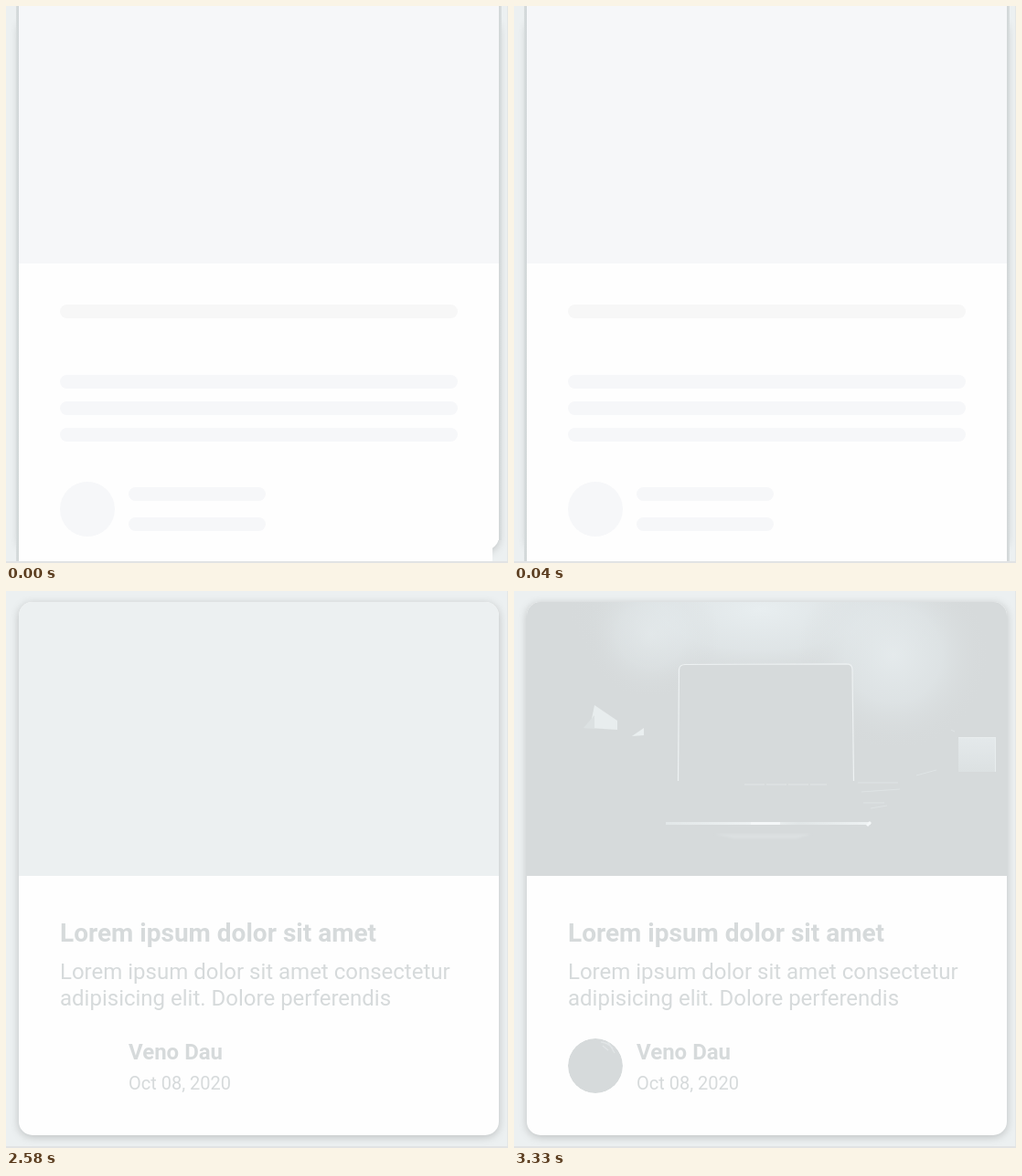
Recreate the animation shown at these times as an HTML page. Size 549 by 610 pixels, loop 3.81 s.

```html
<!DOCTYPE html>
<html lang="en">
<head>
<meta charset="utf-8">
<title>Card skeleton loading</title>
<style>
  html, body { margin: 0; width: 100%; height: 100%; overflow: hidden; background: #ecf0f1; }
  svg { display: block; width: 549px; height: 610px; }
  text { font-family: Roboto, sans-serif; fill: #d6dadb; }
  .bold { font-weight: 700; }
  .bar { fill: #f6f7f9; }
</style>
</head>
<body>
<svg viewBox="0 0 549 610">
  <defs>
    <filter id="shadow" filterUnits="userSpaceOnUse" x="-20" y="-20" width="600" height="660" color-interpolation-filters="sRGB">
      <feDropShadow dx="0" dy="2" stdDeviation="5" flood-color="#000" flood-opacity=".2"/>
    </filter>
    <filter id="soft"><feGaussianBlur stdDeviation="1.2"/></filter>
    <clipPath id="cardClip"><rect x="14" y="12" width="525" height="584" rx="15"/></clipPath>
    <clipPath id="avatarClip"><circle cx="89" cy="520" r="30"/></clipPath>
    <linearGradient id="edgeLeft">
      <stop stop-color="#d9dedf"/><stop offset="1" stop-color="#cfd5d6"/>
    </linearGradient>
    <linearGradient id="edgeRight">
      <stop stop-color="#d0d5d6"/><stop offset="1" stop-color="#dadfe0"/>
    </linearGradient>
    <radialGradient id="glow">
      <stop stop-color="#e8eef0"/>
      <stop offset=".5" stop-color="#e2e8ea" stop-opacity=".75"/>
      <stop offset="1" stop-color="#d6dadb" stop-opacity="0"/>
    </radialGradient>
    <linearGradient id="base">
      <stop stop-color="#e2e7e8"/><stop offset=".45" stop-color="#eef2f3"/>
      <stop offset=".65" stop-color="#e0e5e6"/><stop offset="1" stop-color="#eef2f3"/>
    </linearGradient>
    <linearGradient id="paper" x2="0" y2="1">
      <stop stop-color="#e4e9eb"/><stop offset="1" stop-color="#dce1e2"/>
    </linearGradient>
  </defs>

  <rect width="549" height="610" fill="#ecf0f1"/>
  <rect x="14" y="12" width="525" height="584" rx="15" fill="#fefefe" filter="url(#shadow)"/>

  <g id="skeleton">
    <rect x="11" width="3" height="608" fill="url(#edgeLeft)"/>
    <rect x="539" width="3" height="585" fill="url(#edgeRight)"/>
    <path d="M14 0H539V585H532V608H14Z" fill="#fefefe"/>
    <g id="corner">
      <rect x="532" y="585" width="7" height="23" fill="#fefefe"/>
      <rect x="539" y="585" width="3" height="23" fill="url(#edgeRight)"/>
    </g>
    <rect class="bar" x="14" width="525" height="282"/>
    <rect x="59" y="327" width="435" height="15" rx="7.5" fill="#f7f7f7"/>
    <g id="bars"></g>
    <circle class="bar" cx="89" cy="551" r="30"/>
  </g>

  <g id="content">
    <g clip-path="url(#cardClip)">
      <rect x="14" y="12" width="525" height="300" fill="#ecf0f1"/>
      <g id="photo">
        <rect x="14" y="12" width="525" height="300" fill="#d6dadb"/>
        <svg x="14" y="12" width="525" height="300" viewBox="14 12 525 300">
          <ellipse cx="270" cy="20" rx="215" ry="90" fill="url(#glow)"/>
          <ellipse cx="150" cy="48" rx="75" ry="70" fill="url(#glow)" opacity=".55"/>
          <ellipse cx="415" cy="70" rx="105" ry="105" fill="url(#glow)" opacity=".8"/>
          <path d="M180 208V86Q180 80 186 80L365 79.500Q370 80 370 86L371.500 208Z" fill="#d6dadb"/>
          <path d="M179.500 208L180.500 86Q181 80.500 187 80.500L364 79.800Q370 80 370 86L371.500 208" fill="none" stroke="#eef2f3" stroke-width="1.200"/>
          <path d="M88 125L113 142V152L83 150Z" fill="#e8edee"/>
          <path d="M76 150L88 136V151Z" fill="#dce1e2"/>
          <path d="M129 159L142 150V158Z" fill="#eaeff0"/>
          <rect x="486" y="160" width="41" height="38" fill="url(#paper)"/>
          <path d="M486 160.500H526.500V198" fill="none" stroke="#e8edee"/>
          <path d="M252 212H342" stroke="#e2e6e7" stroke-dasharray="22 2"/>
          <path d="M376 210H420M380 220L422 217M382 232H405M390 238L408 235M440 202L462 196M478 152L482 154" stroke="#dfe4e5"/>
          <rect x="166" y="253" width="224" height="3" fill="url(#base)"/>
          <path d="M259 254.500H291M386 257L390 253" stroke="#f4f7f8" stroke-width="3"/>
          <path d="M220 266H325L310 271H240Z" fill="#dce0e1" filter="url(#soft)"/>
        </svg>
      </g>
    </g>
    <g id="avatar" clip-path="url(#avatarClip)">
      <circle cx="89" cy="520" r="30" fill="#d6dadb"/>
      <path d="M95 494Q102 494 108 501M97 498L103 503M103 494L110 506" fill="none" stroke="#e1e5e6" stroke-width="1.300"/>
    </g>
    <text class="bold" x="59" y="384" font-size="28">Lorem ipsum dolor sit amet</text>
    <text x="59" y="425" font-size="24">Lorem ipsum dolor sit amet consectetur</text>
    <text x="59" y="454" font-size="24">adipisicing elit. Dolore perferendis</text>
    <text class="bold" x="134" y="513" font-size="24">Veno Dau</text>
    <text x="134" y="546" font-size="20">Oct 08, 2020</text>
  </g>

  <rect x="548" width="1" height="610" fill="#e3e6e6"/>
  <rect y="608" width="549" height="2" fill="#e1e3e4"/>
</svg>
<script>
  const LOOP = 3810, FILL_CORNER = 40, LOADED = 2580, IMAGES = 2610;
  const byId = id => document.getElementById(id);
  const show = (id, on) => byId(id).setAttribute("visibility", on ? "inherit" : "hidden");

  function addBar(x, y, width) {
    const bar = document.createElementNS("http://www.w3.org/2000/svg", "rect");
    const attrs = { class: "bar", x, y, width, height: 15, rx: 7.5 };
    for (const [key, value] of Object.entries(attrs)) bar.setAttribute(key, value);
    byId("bars").append(bar);
  }
  [404, 433, 462].forEach(y => addBar(59, y, 435));
  [527, 560].forEach(y => addBar(134, y, 150));

  function render(t) {
    const loaded = t >= LOADED;
    show("skeleton", !loaded);
    show("corner", t >= FILL_CORNER);
    show("content", loaded);
    show("photo", t >= IMAGES);
    show("avatar", t >= IMAGES);
  }

  const start = performance.now();
  function tick() {
    render((performance.now() - start) % LOOP);
    requestAnimationFrame(tick);
  }
  tick();
</script>
</body>
</html>
```
